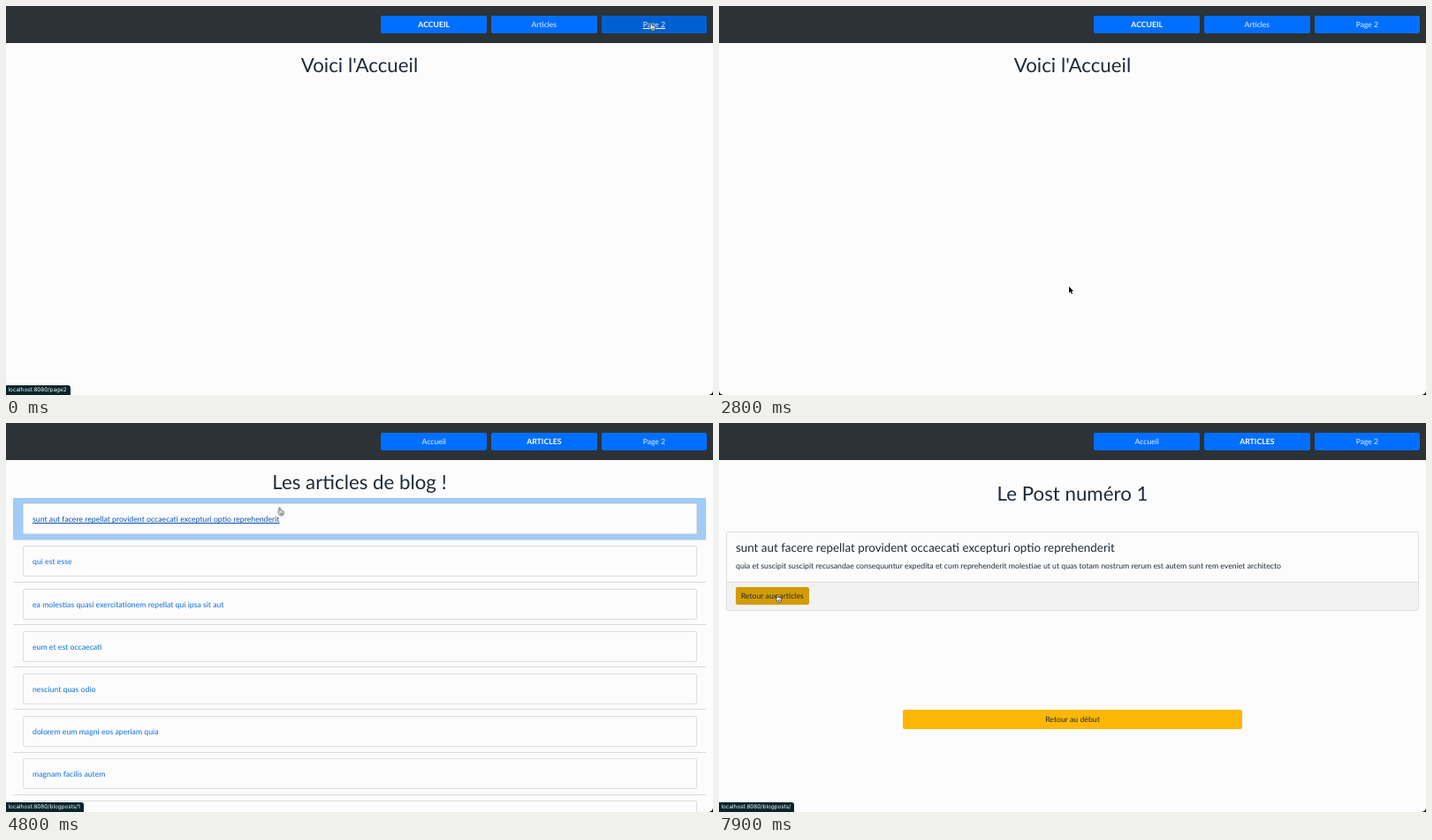
These frames come from a looping animation (800x441 px, 8000 ms). An HTML page:

```html
<!DOCTYPE html>
<html lang="fr">
<head>
<meta charset="utf-8">
<title>Blog</title>
<style>
html, body { margin: 0; width: 100%; height: 100%; overflow: hidden; background: #000; }
body { font: 8.72px/12px Lato, sans-serif; color: #1f2b37; text-rendering: geometricPrecision; }
body * { box-sizing: border-box; }
.stage { position: relative; width: 800px; height: 441px; overflow: hidden; }
.page { position: absolute; inset: 0; background: #fcfcfc; border-radius: 0 0 5px 5px; overflow: hidden; }
.view, .labels, .status, .cursor, .cursor svg { position: absolute; top: 0; left: 0; }
.view { width: 800px; height: 441px; }

/* Every animation shares the same loop; steps give hard cuts. */
.cut { opacity: 0; animation: 8s step-end infinite; }
.fade { animation: 8s linear infinite; }

header { position: absolute; top: 0; left: 0; width: 800px; height: 42px; background: #2c3236; }
.buttons, .labels { position: absolute; top: 11px; left: 424.4px; display: flex; gap: 5px; }
.buttons i, .labels span { width: 119.6px; height: 20.3px; border-radius: 2px; }
.buttons i { background: #006fff; }
.labels { top: 0; left: 0; }
.labels span { font-size: 8.6px; line-height: 20px; text-align: center; color: #e9f2ff; }
.labels b { font-size: 8.7px; color: #fff; text-transform: uppercase; }
.line { text-decoration: underline transparent; }

h1, h2, p { position: absolute; margin: 0; font-weight: 400; white-space: nowrap; }
h1 { top: 53.5px; width: 800px; font-size: 22.3px; line-height: 26px; text-align: center; }
.post h1 { top: 66.5px; }
.yellow { position: absolute; background: #fdb706; border-radius: 2px; text-align: center; }
.wide { left: 208px; top: 312px; width: 384px; height: 22.3px; line-height: 22px; }
.post .wide { top: 324.5px; }
.small { left: 10.5px; top: 62.5px; width: 83.5px; height: 20.5px; line-height: 20px; }

.list { position: absolute; top: 84.7px; left: 8px; width: 784px; }
.row { height: 48.17px; padding: 6.5px 10.5px; border-bottom: 1px solid #d9d9d9; }
.row div { height: 35px; padding-left: 10.5px; line-height: 33px; background: #fcfcfc;
  border: 1px solid #dedede; border-radius: 2px; color: #0b6fdf; }

.card { position: absolute; top: 123px; left: 8px; width: 784px; height: 90px;
  border: 1px solid #dedede; border-radius: 2px; }
.card footer { position: absolute; top: 56px; left: 0; right: 0; bottom: 0;
  background: #f2f2f2; border-top: 1px solid #dedede; }
.card h2 { top: 8px; left: 10px; font-size: 13.38px; line-height: 18px; }
.card p { top: 31.5px; left: 10px; }
.card .small { top: 61.5px; left: 9.5px; }

.status { top: 430px; height: 11px; padding: 0 4px 0 2.5px; background: #06252b; color: #fff;
  border-radius: 0 3px 0 0; font: 6.35px/11px Inter, sans-serif; white-space: nowrap; }
.cursor { animation: move 8s ease-in-out infinite; }
.cursor svg { overflow: visible; width: 8px; height: 10px; }

.home { animation-name: home; }
.second { animation-name: second; }
.blog { animation-name: blog; }
.articles { animation-name: articles; }
.list { animation-name: list; }
.post { animation-name: post; }
@keyframes home { 0%, 30% { opacity: 1 } 11.25%, 50% { opacity: 0 } }
@keyframes second { 11.25% { opacity: 1 } 30% { opacity: 0 } }
@keyframes blog { 50%, 100% { opacity: 1 } }
@keyframes articles { 50% { opacity: 1 } 70% { opacity: 0 } }
@keyframes list { 53.75% { opacity: 1 } 70% { opacity: 0 } }
@keyframes post { 70%, 100% { opacity: 1 } }

.nav-second { animation-name: nav-second; }
.nav-articles { animation-name: nav-articles; }
.line-second { animation-name: line-second; }
.line-articles { animation-name: line-articles; }
.back-home { animation-name: back-home; }
.back-list { animation-name: back-list; }
@keyframes nav-second { 0%, 12.6% { background: #0060d2 } 14.4%, 100% { background: #006fff } }
@keyframes nav-articles {
  0%, 44.2%, 59%, 100% { background: #006fff }
  45.8%, 57.2% { background: #0060d2 }
}
@keyframes line-second { 0%, 12.6% { text-decoration-color: #fff } 12.7%, 100% { text-decoration-color: transparent } }
@keyframes line-articles {
  0%, 44.2%, 57.3%, 100% { text-decoration-color: transparent }
  44.3%, 57.2% { text-decoration-color: #fff }
}
@keyframes back-home { 0%, 20.8% { background: #fdb706 } 22.3%, 100% { background: #d99b04 } }
@keyframes back-list { 0%, 92% { background: #fdb706 } 93.5%, 100% { background: #d49b06 } }

.row:first-child { animation: row 8s step-end infinite; }
.row:first-child div { animation: link 8s step-end infinite; }
@keyframes row { 58.75% { background: #a2cbf8 } 70% { background: transparent } }
@keyframes link { 59% { color: #0451ac; text-decoration: underline } 70% { color: #0b6fdf; text-decoration: none } }

.at-second { animation-name: at-second; }
.at-blog { animation-name: at-blog; }
.at-post { animation-name: at-post; }
.at-back { animation-name: at-back; }
@keyframes at-second { 0% { opacity: 1 } 15% { opacity: 0 } }
@keyframes at-blog { 46.25% { opacity: 1 } 58.75% { opacity: 0 } }
@keyframes at-post { 58.75% { opacity: 1 } 71.25% { opacity: 0 } }
@keyframes at-back { 96.25%, 100% { opacity: 1 } }

.hand { animation-name: hand; }
.arrow { animation-name: arrow; }
@keyframes hand {
  0%, 21%, 44.2%, 58.6%, 92% { opacity: 1 }
  12.8%, 31.25%, 57.3%, 71% { opacity: 0 }
  100% { opacity: 1 }
}
@keyframes arrow {
  0%, 21%, 44.2%, 58.6%, 92%, 100% { opacity: 0 }
  12.8%, 31.25%, 57.3%, 71% { opacity: 1 }
}
@keyframes move {
  0%, 1.25% { transform: translate(728px, 18.5px) }
  5%, 11.5% { transform: translate(729px, 18px) }
  17.5%, 20% { transform: translate(400px, 297px) }
  22.5% { transform: translate(391px, 321px) }
  26.25%, 30% { transform: translate(393px, 320px) }
  32.5%, 35% { transform: translate(396px, 318px) }
  45% { transform: translate(601px, 20px) }
  48.75%, 56.25% { transform: translate(595px, 18px) }
  59.6% { transform: translate(309px, 94.5px) }
  60% { transform: translate(307.5px, 95.5px) }
  67.5%, 72% { transform: translate(205px, 105px) }
  78.75%, 85% { transform: translate(223.5px, 108px) }
  95% { transform: translate(66px, 195px) }
  97.5%, 100% { transform: translate(64px, 194px) }
}
</style>
</head>
<body>
<div class="stage">
  <div class="page">
    <header>
      <div class="buttons">
        <i></i><i class="fade nav-articles"></i><i class="fade nav-second"></i>
        <div class="labels cut home">
          <span><b>Accueil</b></span>
          <span><span class="fade line line-articles">Articles</span></span>
          <span><span class="fade line line-second">Page 2</span></span>
        </div>
        <div class="labels cut second">
          <span>Accueil</span><span>Articles</span>
          <span><b class="fade line line-second">Page 2</b></span>
        </div>
        <div class="labels cut blog">
          <span>Accueil</span>
          <span><b class="fade line line-articles">Articles</b></span>
          <span>Page 2</span>
        </div>
      </div>
    </header>

    <section class="view cut home"><h1>Voici l'Accueil</h1></section>

    <section class="view cut second">
      <h1>Voici la Page 2</h1>
      <div class="yellow wide fade back-home">Retour au début</div>
    </section>

    <section class="view cut articles">
      <h1>Les articles de blog !</h1>
      <div class="list cut">
        <div class="row"><div>sunt aut facere repellat provident occaecati excepturi optio reprehenderit</div></div>
        <div class="row"><div>qui est esse</div></div>
        <div class="row"><div>ea molestias quasi exercitationem repellat qui ipsa sit aut</div></div>
        <div class="row"><div>eum et est occaecati</div></div>
        <div class="row"><div>nesciunt quas odio</div></div>
        <div class="row"><div>dolorem eum magni eos aperiam quia</div></div>
        <div class="row"><div>magnam facilis autem</div></div>
        <div class="row"><div></div></div>
      </div>
    </section>

    <section class="view cut post">
      <h1>Le Post numéro 1</h1>
      <div class="card">
        <h2>sunt aut facere repellat provident occaecati excepturi optio reprehenderit</h2>
        <p>quia et suscipit suscipit recusandae consequuntur expedita et cum reprehenderit molestiae ut ut quas totam nostrum rerum est autem sunt rem eveniet architecto</p>
        <footer></footer>
        <div class="yellow small fade back-list">Retour aux articles</div>
      </div>
      <div class="yellow wide">Retour au début</div>
    </section>
  </div>

  <div class="status cut at-second">localhost:8080/page2</div>
  <div class="status cut at-blog">localhost:8080/blogposts</div>
  <div class="status cut at-post">localhost:8080/blogposts/1</div>
  <div class="status cut at-back">localhost:8080/blogposts/</div>

  <div class="cursor">
    <svg class="cut arrow" viewBox="0 0 8 10">
      <path d="M0 0v7.2l1.7-1.5 1.2 2.7 1.2-.5-1.2-2.6h2.3z" fill="#000" stroke="#fff" stroke-width=".7" paint-order="stroke"/>
    </svg>
    <svg class="cut hand" viewBox="0 0 8 10">
      <path d="M2 .5c.8 0 1 .5 1 1.2v2l3 .6c.7.2.9.7.8 1.4l-.5 2.2-.6 1.3H2.6L.6 5.7c-.4-.7.2-1.1.7-.7V1.7C1.3.9 1.4.5 2 .5zM3.4 6v2M4.8 6v2" fill="#fff" stroke="#222" stroke-width=".75" stroke-linejoin="round"/>
    </svg>
  </div>
</div>
</body>
</html>
```
